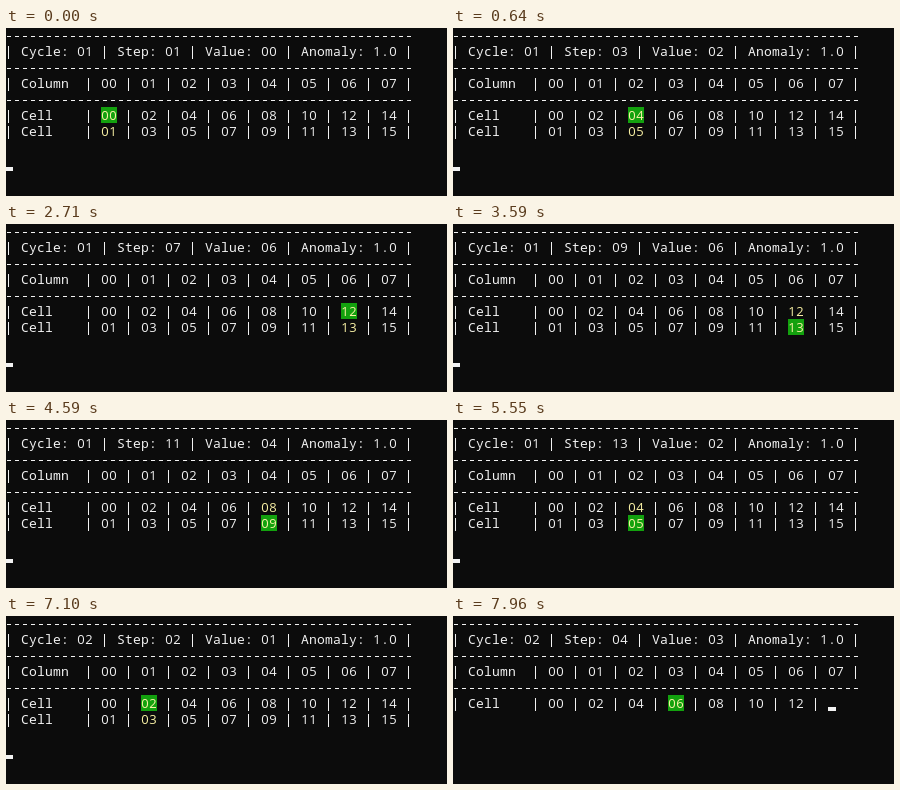
These frames come from a looping animation (441 px wide and 168 px high, 8000 ms). An HTML page:

```html
<!DOCTYPE html>
<html lang="en">
<head>
<meta charset="utf-8">
<title>Sequence memory console</title>
<style>
  html, body { margin: 0; width: 100%; height: 100%; overflow: hidden; background: #0c0c0c; }
  svg { display: block; width: 441px; height: 168px; }
  text { font: 13px "Noto Sans Mono", "DejaVu Sans Mono", monospace; text-anchor: middle; fill: #f2f2f2; }
  .num { font-family: "Open Sans", "Noto Sans", sans-serif; }
  .lit { fill: #f9f1a5; }
  .rule, .bar { fill: none; stroke: #f2f2f2; stroke-width: 1; shape-rendering: crispEdges; }
  .rule { stroke-dasharray: 4 4; }
  .cursor { fill: #f2f2f2; }
  .active { fill: #13a10e; }
</style>
</head>
<body>
<svg viewBox="0 0 441 168">
  <rect class="active" width="16" height="16"/>
  <g id="screen"></g>
  <rect class="cursor" width="8" height="4"/>
</svg>
<script>
const LOOP = 8000;
const STARTS = [0, 210, 640, 1190, 1740, 2160, 2710, 3140, 3590, 4140, 4590,
                5120, 5550, 6120, 6550, 7100, 7530, 7960];
const STEPS = 14;
const BLANK = [6980, 7100];

const screen = document.getElementById('screen');
const active = document.querySelector('.active');
const cursor = document.querySelector('.cursor');

// Character grid: 8 x 16 cells, shifted one pixel up and left
const cx = col => col * 8 - 1;
const cy = row => row * 16 - 1;
const pad = n => String(n).padStart(2, '0');

function add(tag, attrs, content = '') {
  const el = document.createElementNS('http://www.w3.org/2000/svg', tag);
  for (const key in attrs) el.setAttribute(key, attrs[key]);
  el.textContent = content;
  screen.append(el);
  return el;
}

function write(row, col, str) {
  return add('text', {
    x: [...str].map((_, i) => cx(col + i) + 4).join(' '),
    y: cy(row) + 13,
    class: /^[\d.]+$/.test(str) ? 'num' : 'word'
  }, str);
}

function bars(row, cols) {
  const d = cols.map(c => `M${cx(c) + 3.5} ${cy(row) + 3}v13`).join('');
  return add('path', { class: 'bar', d });
}

function place(el, col, row, dy = 0) {
  el.setAttribute('x', cx(col));
  el.setAttribute('y', cy(row) + dy);
}

const slots = [...Array(8).keys()];
const slotCol = k => 12 + k * 5;
const tableBars = [0, 10, ...slots.map(k => 15 + k * 5)];

for (const row of [0, 2, 4]) add('path', { class: 'rule', d: `M1 ${cy(row) + 9.5}h404` });

bars(1, [0, 12, 23, 35, 50]);
write(1, 2, 'Cycle:');
write(1, 14, 'Step:');
write(1, 25, 'Value:');
write(1, 37, 'Anomaly:');
write(1, 46, '1.0');
const cycleText = write(1, 9, '01');
const stepText = write(1, 20, '01');
const valueText = write(1, 32, '00');

bars(3, tableBars);
write(3, 2, 'Column');
slots.forEach(k => write(3, slotCol(k), pad(k)));

bars(5, tableBars.slice(0, -1));
const lastBar = bars(5, [50]);
const lowerBars = bars(6, tableBars);
write(5, 2, 'Cell');
const lowerLabel = write(6, 2, 'Cell');
const cells = slots.map(k => [0, 1].map(j => write(5 + j, slotCol(k), pad(2 * k + j))));

// Parts not yet printed while the table is being redrawn
const pending = [lastBar, lowerBars, lowerLabel, cells[7][0], ...cells.map(pair => pair[1])];

let shown = '';

function draw(t) {
  const n = STARTS.findLastIndex(start => start <= t);
  const blank = t >= BLANK[0] && t < BLANK[1];
  const key = n + ':' + blank;
  if (key === shown) return;
  shown = key;

  const step = n % STEPS;
  const value = step < 8 ? step : 14 - step;
  const partial = n === STARTS.length - 1;

  cycleText.textContent = pad(1 + Math.floor(n / STEPS));
  stepText.textContent = pad(step + 1);
  valueText.textContent = pad(value);
  cells.forEach((pair, k) => pair.forEach(c => c.classList.toggle('lit', k === value)));
  place(active, slotCol(value), step < 8 ? 5 : 6);
  place(cursor, partial ? 47 : 0, partial ? 5 : 8, 12);

  pending.forEach(el => el.style.display = partial ? 'none' : '');
  screen.style.display = active.style.display = blank ? 'none' : '';
}

const origin = performance.now();
function tick() {
  draw((performance.now() - origin) % LOOP);
  requestAnimationFrame(tick);
}
tick();
</script>
</body>
</html>
```
